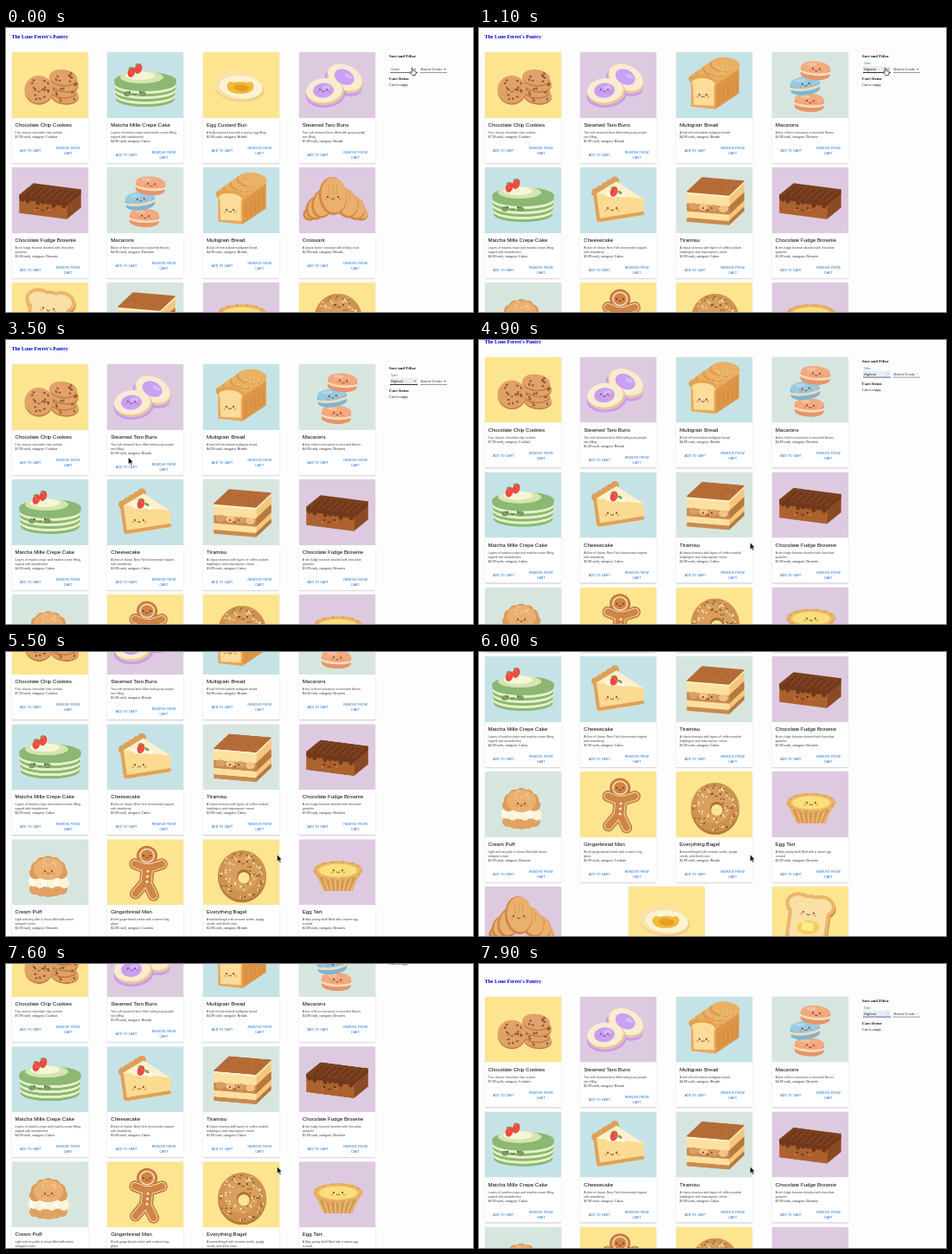
These frames come from a looping animation (540 by 328 pixels, 8 s). An HTML page with a canvas:

```html
<!DOCTYPE html>
<html lang="en">
<head>
<meta charset="utf-8">
<title>Bakery shop</title>
<style>
html,body{margin:0;width:100%;height:100%;overflow:hidden;background:#fdfdfd}
#stage{position:absolute;left:0;top:0;width:540px;height:328px;overflow:hidden}
#page,.card,.card canvas,.t,.box,#cursor{position:absolute;left:0;top:0}
.card{width:88px;background:#fff;border-radius:1px;box-shadow:0 .6px 1.2px rgba(0,0,0,.28)}
.card canvas{width:88px;height:76px;border-radius:1px 1px 0 0}
.t{line-height:0;white-space:nowrap;font-family:"Liberation Sans",Arial,sans-serif;color:#222}
.serif{font-family:"Liberation Serif",Times,serif;color:#111}
.name{font-size:6.12px;color:#000}
.desc{font-size:3.5px;color:#444}
.price{font-size:4.05px;color:#222}
.btn{font-size:3.5px;letter-spacing:.028em;color:#1668cc}
.mid{transform:translateX(-50%)}
.title{font-size:6px;font-weight:bold;color:#0000e0}
.head{font-size:4.9px;font-weight:bold}
.body{font-size:4.1px}
.field{font-size:4.1px;color:#444}
#cursor{width:9px;height:12px;overflow:visible}
</style>
</head>
<body>
<div id="stage">
  <div id="page"></div>
  <svg id="cursor" viewBox="0 0 9 12">
    <path id="arrow" d="M0 0V8L1.9 6.3L3.2 9.2L4.5 8.6L3.2 5.8H5.6Z" fill="#000" stroke="#fff" stroke-width=".5"/>
    <path id="hand" d="M2 .6Q3-.2 3.4.9L3.8 3.2L6.4 3.8Q7.4 4.1 7.2 5.6L6.4 8.6H2.9L.4 5.6Q.1 4.5 1.2 4.7L2.3 5.5Z" fill="#fff" stroke="#111" stroke-width=".7"/>
  </svg>
</div>
<script>
const page = document.getElementById('page');
const cursor = document.getElementById('cursor');
const arrow = document.getElementById('arrow');
const hand = document.getElementById('hand');
const YELLOW = '#fde58f', BLUE = '#c5e3e6', PURPLE = '#decae0', GREEN = '#d6e6df';
let g;

// ---- drawing helpers (88 x 76 picture space) ----
function oval(x, y, rx, ry, color, turn = 0) {
  g.fillStyle = color;
  g.beginPath();
  g.ellipse(x, y, rx, ry, turn, 0, 7);
  g.fill();
}
function line(color, w, ...p) {
  g.strokeStyle = color;
  g.lineWidth = w;
  g.lineCap = g.lineJoin = 'round';
  g.beginPath();
  for (let i = 0; i < p.length; i += 2) g.lineTo(p[i], p[i + 1]);
  g.stroke();
}
function poly(color, ...p) {
  line(color, 1.5, ...p, p[0], p[1]);
  g.fillStyle = color;
  g.fill();
}
function spin(x, y, turn, draw) {
  g.save();
  g.translate(x, y);
  g.rotate(turn);
  draw();
  g.restore();
}
function repeat(n, draw) {
  for (let i = 0; i < n; i++) draw(i);
}
function face(x, y, d = 5, color = '#6b3a20') {
  for (const s of [-1, 1]) {
    oval(x + s * (d + 2), y + 2.4, 1.8, 1.2, 'rgba(240,125,80,.5)');
    oval(x + s * d, y, .9, 1.1, color);
  }
  g.strokeStyle = color;
  g.lineWidth = .7;
  g.beginPath();
  g.arc(x, y + 1, 1.8, .3, 2.84);
  g.stroke();
}
function specks(x, y, rx, ry, n, color, size, seed, inner = 0) {
  const rnd = () => (seed = seed * 16807 % 2147483647) / 2147483647;
  repeat(n, () => {
    const a = rnd() * 6.283, r = inner + (1 - inner) * Math.sqrt(rnd());
    oval(x + rx * r * Math.cos(a), y + ry * r * Math.sin(a), size, size * .65, color, a * 3);
  });
}
function berry(x, y) {
  oval(x, y, 4.2, 6, '#ec4a40', .3);
  specks(x, y, 3, 4, 6, '#f9b49a', .4, 370 + x);
  oval(x - 1, y - 5, 2.5, 1, '#7aa557', -.3);
}
// A leaning block: o.x, o.y is its front top left corner, dx, dy its depth.
function layer(o, from, to, front, side) {
  const r = o.x + o.w, a = o.y + o.h * from, b = o.y + o.h * to;
  poly(side, r, a + o.tilt, r + o.dx, a + o.tilt + o.dy, r + o.dx, b + o.tilt + o.dy, r, b + o.tilt);
  poly(front, o.x, a, r, a + o.tilt, r, b + o.tilt, o.x, b);
}
function lid(o, color) {
  const r = o.x + o.w;
  poly(color, o.x, o.y, o.x + o.dx, o.y + o.dy, r + o.dx, o.y + o.tilt + o.dy, r, o.y + o.tilt);
}

// ---- pictures ----
const art = {
  cookies() {
    const cookie = (x, y, rx, ry, chips) => {
      oval(x, y + 1.6, rx, ry, '#c27c45', .1);
      oval(x, y, rx, ry, '#e0a268', .1);
      specks(x, y, rx * .85, ry * .8, chips, '#96552f', 1.6, x * 31 + y, .3);
    };
    repeat(4, i => cookie(61 - (i % 2) * 2, 50 - i * 7, 16, 9, 9));
    cookie(31, 43, 16.5, 16, 13);
    face(31, 43, 4);
  },
  matcha() {
    repeat(8, i => oval(44, 54 - i * 3, 34 + i * .25, 9, i % 2 ? '#e9f1c8' : '#8ab873'));
    oval(44, 33, 36, 10, '#8cb873');
    oval(40, 29, 25, 7, '#d5e5b0');
    oval(38, 27, 17, 5, '#f5f5d8');
    for (const s of [-1, 1]) oval(32 + s * 9, 48, 4, 3, '#6fa265');
    berry(28, 23);
    berry(36, 19);
    face(32, 46, 6, '#35583a');
  },
  eggbun() {
    oval(42, 42, 29, 15, '#efcf86', .1);
    oval(41, 39, 28, 16, '#f8e2ac', .1);
    oval(44, 40, 25, 13, '#fdf3d3', .1);
    oval(43, 41, 15, 7, '#f3b93a');
    repeat(5, i => oval(32 + i * 5.5, 39 + (i % 2) * 3, 4.5, 5, '#f3b93a'));
    oval(44, 41, 9, 4, '#e79d22', .1);
  },
  taro() {
    const bun = (x, y, turn) => spin(x, y, turn, () => {
      oval(1, 6, 23, 14, '#c99cf2');
      oval(1, 2, 22, 15, '#e9c894');
      oval(0, 0, 21, 14, '#f9ecd0');
      oval(-1, 0, 12, 8.5, '#c9a0f3');
      oval(3, -3, 5, 2.5, '#d8b9f8');
    });
    bun(53, 29, .45);
    bun(29, 44, -.1);
    face(28, 43, 4, '#70468f');
  },
  brownie() {
    const o = {x: 9, y: 32, w: 54, tilt: 7, h: 20, dx: 16, dy: -13};
    layer(o, 0, 1, '#ab622f', '#8a4a25');
    layer(o, 0, .2, '#71391b', '#71391b');
    lid(o, '#7b4020');
    repeat(9, i => oval(12 + i * 6, 36 + i * .9, 3, 3.5 + 2 * Math.sin(i * 2.4), '#71391b'));
    repeat(7, i => line('#5e2e17', .9, 17 + i * 7, 32 + i, 28 + i * 7, 22 + i));
    face(35, 47, 6, '#4a2112');
  },
  macarons() {
    const shell = (x, y, top, low, turn) => spin(x, y, turn, () => {
      oval(0, 4.5, 17, 6.5, low);
      oval(0, 2, 17, 4, '#f8dcb8');
      oval(0, -1, 17.5, 4, low);
      oval(0, -3.5, 17, 7, top);
      oval(-5, -6.5, 6, 2, 'rgba(255,255,255,.25)');
      face(1, -2, 4);
    });
    shell(43, 58, '#f3aa80', '#e8946a', .05);
    shell(38, 38.5, '#98cae2', '#7cb6d4', -.12);
    shell(50, 21, '#f3aa80', '#e8946a', .08);
  },
  multigrain() {
    const o = {x: 18, y: 34, w: 27, tilt: 3, h: 28, dx: 27, dy: -18};
    layer(o, 0, 1, '#e9a95a', '#dd9646');
    lid(o, '#eab063');
    repeat(14, i => oval(31 + i * 2, 32 - i * 1.4, 16.5, 8, i % 4 ? '#eab063' : '#dc9a4e', .1));
    oval(31, 33, 16, 7, '#e4a253', .1);
    oval(31.5, 36, 13.5, 6, '#fbdc98', .1);
    poly('#fbdc98', 20, 38, 43, 40, 43, 61, 21, 60);
    repeat(5, i => line('#c98138', .6, 50 + i * 5, 42 - i * 3, 50 + i * 5, 58 - i * 3));
    specks(50, 22, 18, 8, 22, '#f8dda2', .7, 19);
    face(31, 49, 4);
  },
  croissant() {
    const roll = (x, y, rx, ry, turn) => {
      oval(x, y, rx, ry, '#cf8742', turn);
      oval(x + 1, y - 1, rx - 1.5, ry - 1.5, '#eab06d', turn);
      repeat(3, i => line('#d69652', .8, x - 5 + i * 5, y - ry * .6, x - 4 + i * 4, y - ry * .1));
    };
    for (const s of [1, -1]) {
      roll(42 + s * 28, 53, 10, 8, s * .5);
      roll(42 + s * 22, 47, 12, 14, -s * .45);
      roll(41 + s * 13, 41, 13, 18, -s * .35);
    }
    roll(39, 33, 16, 22, -.1);
    face(39, 34, 6);
  },
  cheesecake() {
    repeat(5, i => oval(18 + i * 5.5, 29 - i * 3.4, 5, 5, '#dda05a'));
    poly('#fff0cb', 19, 31, 42, 17, 73, 37);
    poly('#fbdb92', 17, 31, 73, 37, 72, 55, 22, 63);
    line('#dea25c', 4, 22, 61, 72, 53);
    line('#dea25c', 4, 17, 31, 21, 60);
    repeat(4, i => oval(34 + i * 5, 31 + i % 2, 4, 3, '#fff8e8'));
    berry(39, 28);
    oval(46, 29, 3, 1.5, '#7aa557', .5);
    face(37, 47);
  },
  tiramisu() {
    const o = {x: 13, y: 30, w: 48, tilt: 4, h: 32, dx: 17, dy: -16};
    layer(o, 0, 1, '#fce0a0', '#f3c67c');
    layer(o, .38, .62, '#c98a4e', '#b87840');
    layer(o, .9, 1, '#c98a4e', '#b87840');
    repeat(4, i => oval(20 + i * 11.5, 45 + i, 5.5, 4, i % 2 ? '#f2c384' : '#d9a066'));
    lid(o, '#fff0c8');
    lid({...o, y: o.y - 2}, '#b56c37');
    specks(46, 23, 24, 5, 20, '#a35c2b', .8, 41);
    face(36, 47);
  },
  creampuff() {
    repeat(5, i => oval(27 + i * 7.5, 58 + 3 * Math.sin(i * .8), 7, 6, '#e0a262'));
    repeat(6, i => oval(25 + i * 7, 48 + (i % 2) * 2, 6, 6.5, i % 2 ? '#fdf3d6' : '#fff9ea'));
    repeat(7, i => oval(42 - 15 * Math.cos(i * .52), 39 - 13 * Math.sin(i * .52), 7, 7, '#dd9b5a'));
    oval(42, 34, 17, 13, '#eab072');
    specks(42, 28, 13, 6, 9, '#f3c78e', 1.5, 55);
    face(42, 37, 4);
  },
  gingerbread() {
    const limbs = (color, w) => spin(46, 40, .1, () => {
      line(color, w, -15, -10, 0, -6, 16, -13);
      line(color, w + 3, 0, -6, 0, 8);
      line(color, w, -11, 24, 0, 8, 10, 24);
      oval(-2, -21, w * .92, w * .86, color);
    });
    limbs('#b4672f', 13);
    limbs('#d08545', 12);
    limbs('#fbeeda', 9.5);
    limbs('#d08545', 8);
    repeat(3, i => oval(47 - i * .5, 37 + i * 6, 1.4, 1.4, '#fff3df'));
    face(46, 19, 4);
  },
  bagel() {
    oval(45, 43, 28, 30, '#b9783a');
    oval(45, 41.5, 27.5, 28.5, '#cf9350');
    oval(44, 39, 20, 21, '#d89f5e');
    specks(45, 42, 26, 27, 46, '#fbe8bd', 1.2, 23, .35);
    specks(45, 42, 26, 27, 30, '#6b4023', 1, 131, .35);
    oval(47, 43, 8, 8, '#ad6d35');
    oval(47, 44.5, 6.7, 6.5, YELLOW);
    face(46, 26);
  },
  tart() {
    poly('#d59850', 20, 40, 69, 40, 61, 59, 29, 59);
    repeat(8, i => line('#e9b873', 2.2, 21 + i * 6.8, 42, 29 + i * 4.4, 59));
    repeat(28, i => {
      const a = i * Math.PI / 14;
      oval(45 + 25.5 * Math.cos(a), 36 + 9 * Math.sin(a), 3, 2.4, i % 2 ? '#e8b36a' : '#e0a55b');
    });
    oval(45, 36, 25, 9, '#efbb68');
    oval(45, 36, 22, 7.5, '#fae07c');
    face(45, 36);
  },
  toast() {
    const slice = (grow, color) => {
      g.fillStyle = color;
      g.beginPath();
      g.roundRect(-20 - grow, -20, 40 + grow * 2, 44 + grow, 5);
      g.fill();
      for (const s of [-1, 1]) oval(s * 13, -16, 12 + grow, 9 + grow, color);
      oval(0, -17, 12, 7 + grow, color);
    };
    spin(42, 37, .14, () => {
      spin(1, 2, 0, () => slice(4, '#cf8a45'));
      slice(4, '#ecb56c');
      slice(0, '#fadfa6');
      oval(1, 10, 13, 8, '#f6cd55', -.2);
      poly('#fde992', -6, 5, 6, 5, 6, 13, -6, 13);
      face(-1, -7, 6);
    });
  }
};

// key: name, description, price, category, backdrop
const goods = {
  cookies: ['Chocolate Chip Cookies', 'Four classic chocolate chip cookies', 7.99, 'Cookies', YELLOW],
  matcha: ['Matcha Mille Crepe Cake', 'Layers of matcha crepe and matcha cream filling,|topped with strawberries', 4.99, 'Cakes', BLUE],
  eggbun: ['Egg Custard Bun', 'A fluffy steamed bun with a savory egg filling', 2.99, 'Breads', YELLOW],
  taro: ['Steamed Taro Buns', 'Two soft steamed buns filled with gooey purple|taro filling', 5.99, 'Breads', PURPLE],
  brownie: ['Chocolate Fudge Brownie', 'A rich fudge brownie drizzled with chocolate|ganache', 3.99, 'Desserts', PURPLE],
  macarons: ['Macarons', 'A box of three macarons in assorted flavors', 4.99, 'Desserts', GREEN],
  multigrain: ['Multigrain Bread', 'A loaf of fresh-baked multigrain bread', 4.99, 'Breads', BLUE],
  croissant: ['Croissant', 'A classic butter croissant with a flaky crust', 2.99, 'Breads', PURPLE],
  toast: ['Toast with Butter', 'A slice of toast with a pat of butter', 1.99, 'Breads', YELLOW],
  tiramisu: ['Tiramisu', 'A classic tiramisu with layers of coffee-soaked|ladyfingers and mascarpone cream', 3.99, 'Cakes', GREEN],
  tart: ['Egg Tart', 'A flaky pastry shell filled with a sweet egg|custard', 2.99, 'Desserts', PURPLE],
  bagel: ['Everything Bagel', 'A toasted bagel with sesame seeds, poppy|seeds, and dried onion', 2.99, 'Breads', YELLOW],
  cheesecake: ['Cheesecake', 'A slice of classic New York cheesecake topped|with strawberry', 3.99, 'Cakes', BLUE],
  creampuff: ['Cream Puff', 'Light and airy pâte à choux filled with sweet|whipped cream', 2.99, 'Desserts', GREEN],
  gingerbread: ['Gingerbread Man', 'A soft gingerbread cookie with a sweet long|glaze', 2.99, 'Cookies', YELLOW]
};
const menuOrder = Object.keys(goods);
const priceOrder = ('cookies taro multigrain macarons matcha cheesecake tiramisu brownie ' +
  'creampuff gingerbread bagel tart croissant eggbun toast').split(' ');

// ---- page building ----
function add(parent, tag, cls) {
  const e = document.createElement(tag);
  e.className = cls;
  parent.appendChild(e);
  return e;
}
function put(parent, cls, x, y, text) {
  const e = add(parent, 'div', 't ' + cls);
  e.style.left = x + 'px';
  e.style.top = y + 'px';
  e.textContent = text;
  return e;
}
function box(x, y, w, h, color) {
  const e = add(page, 'div', 'box');
  e.style.cssText = `left:${x}px;top:${y}px;width:${w}px;height:${h}px;background:${color}`;
  return e;
}

const cards = {};
for (const key of menuOrder) {
  const [name, desc, price, kind, back] = goods[key];
  const card = cards[key] = add(page, 'div', 'card');
  const pic = add(card, 'canvas', '');
  pic.width = 176;
  pic.height = 152;
  g = pic.getContext('2d');
  g.scale(2, 2);
  g.fillStyle = back;
  g.fillRect(0, 0, 88, 76);
  art[key]();
  put(card, 'name', 4, 84.3, name);
  const lines = desc.split('|'), drop = (lines.length - 1) * 5.2;
  lines.forEach((s, i) => put(card, 'desc', 4, 92.7 + i * 5.2, s));
  put(card, 'serif price', 4, 97.5 + drop, `$${price} each, category: ${kind}`);
  put(card, 'btn', 9.7, 113.6 + drop, 'ADD TO CART');
  put(card, 'btn mid', 65.2, 110.6 + drop, 'REMOVE FROM');
  put(card, 'btn mid', 65.2, 116.8 + drop, 'CART');
}

put(page, 'serif title', 6.5, 10, 'The Lone Ferret\'s Pantry');
put(page, 'serif head', 443, 32.6, 'Sort and Filter');
const fieldBack = box(443.5, 43.5, 32, 8, '#ececec');
const orderLine = box(443.5, 51, 32, .7, '#333');
box(479, 51.2, 31, .4, '#999');
const label = put(page, 'field', 445, 47.5, 'Order');
const value = put(page, 'field', 445, 47.6, 'Highest');
value.style.color = '#222';
put(page, 'field', 479.5, 47.5, 'Baked Goods');
for (const x of [471.5, 506]) box(x, 47, 2.6, 1.4, '#444').style.clipPath = 'polygon(0 0,100% 0,50% 100%)';
put(page, 'serif head', 443, 58.5, 'Cart Items');
put(page, 'serif body', 443, 66, 'Cart is empty');

// ---- motion ----
const SORT_AT = 1000, MOVE_AT = 1350, SCROLL_AT = 4650, LOOP = 8000;

function ease(t, from, to) {
  const p = Math.min(1, Math.max(0, (t - from) / (to - from)));
  return p * p * (3 - 2 * p);
}
// Down to the end of the page, then back with a bounce past the top.
function scrollAt(t) {
  return Math.min(230, 234 * ease(t, SCROLL_AT, 6854)) - 239.6 * ease(t, 7100, 7900);
}
function cursorAt(t) {
  const a = ease(t, MOVE_AT, 1950), b = ease(t, 2300, 3350), c = ease(t, 3750, 4600);
  return [467 - 39.5 * a - 286 * b + 172 * c, 46 + 219 * a - 129.5 * b + 98.5 * c];
}

let sorted = null;
function arrange(on) {
  if (on === sorted) return;
  sorted = on;
  (on ? priceOrder : menuOrder).forEach((key, i) => {
    const row = i >> 2, gap = row < 3 ? 110.75 : 166.12, s = cards[key].style;
    s.left = 6.5 + (i % 4) * gap + 'px';
    s.top = 28 + row * 133 + 'px';
    s.height = (row < 3 ? 128.3 : 123.2) + 'px';
  });
  label.style.top = on ? '41.2px' : '47.5px';
  label.style.fontSize = on ? '3.1px' : '4.1px';
  label.style.color = on ? '#1976d2' : '#555';
  value.style.display = fieldBack.style.display = on ? '' : 'none';
}

function render(t) {
  arrange(t >= SORT_AT);
  fieldBack.style.background = t < SCROLL_AT ? '#ececec' : '#e8eef6';
  orderLine.style.background = t < SORT_AT || t >= SCROLL_AT ? '#5a7590' : '#333';
  page.style.transform = `translateY(${-scrollAt(t)}px)`;
  const [x, y] = cursorAt(t), pointing = t < MOVE_AT;
  cursor.style.transform = `translate(${x}px,${y}px)`;
  hand.style.display = pointing ? '' : 'none';
  arrow.style.display = pointing ? 'none' : '';
}

const start = performance.now();
function tick() {
  render((performance.now() - start) % LOOP);
  requestAnimationFrame(tick);
}
tick();
</script>
</body>
</html>
```
